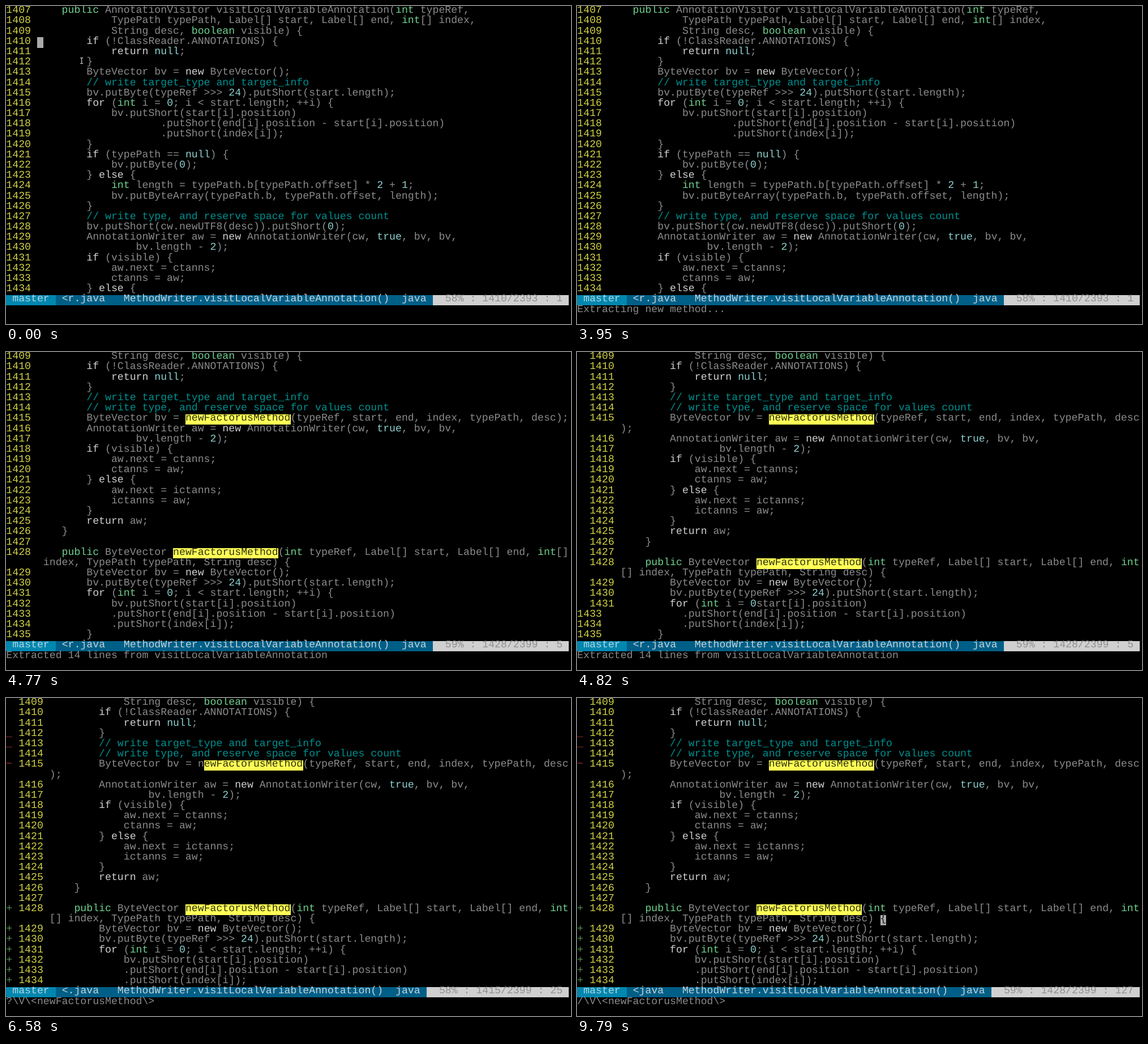
An HTML page that plays this animation: 998 px wide and 561 px high, repeating every 9.88 s.

```html
<!DOCTYPE html>
<html lang="en">
<head>
<meta charset="utf-8">
<title>Extract method in a terminal editor</title>
<style>
  html, body { margin: 0; width: 100%; height: 100%; overflow: hidden; background: #000; }
  svg { display: block; width: 998px; height: 561px; }
  text {
    font: 18.2px "Liberation Mono", "Courier New", monospace;
    fill-opacity: .82;
    white-space: pre;
    text-rendering: geometricPrecision;
  }
</style>
</head>
<body>
<svg id="screen" viewBox="0 0 998 561"></svg>
<script>
const LOOP = 9880, COLS = 91, ROWS = 28;
const LEFT = 0.35, TOP = 0.8, CELL_W = 10.922, CELL_H = 18.18, BASELINE = 11.5;
const GRAY = '#aaaaaa', YELLOW = '#ffff55', GREEN = '#87ffaf', CYAN = '#afffff',
      WHITE = '#ffffff', TEAL = '#00b0b0', RED = '#c03838', ADDED = '#5faf5f';

const HEAD = `        if (!ClassReader.ANNOTATIONS) {
            return null;
        }`;

const TAIL = `        AnnotationWriter aw = new AnnotationWriter(cw, true, bv, bv,
                bv.length - 2);
        if (visible) {
            aw.next = ctanns;
            ctanns = aw;
        } else {
            aw.next = ictanns;
            ictanns = aw;`;

const BEFORE = `    public AnnotationVisitor visitLocalVariableAnnotation(int typeRef,
            TypePath typePath, Label[] start, Label[] end, int[] index,
            String desc, boolean visible) {
${HEAD}
        ByteVector bv = new ByteVector();
        // write target_type and target_info
        bv.putByte(typeRef >>> 24).putShort(start.length);
        for (int i = 0; i < start.length; ++i) {
            bv.putShort(start[i].position)
                    .putShort(end[i].position - start[i].position)
                    .putShort(index[i]);
        }
        if (typePath == null) {
            bv.putByte(0);
        } else {
            int length = typePath.b[typePath.offset] * 2 + 1;
            bv.putByteArray(typePath.b, typePath.offset, length);
        }
        // write type, and reserve space for values count
        bv.putShort(cw.newUTF8(desc)).putShort(0);
${TAIL}`.split('\n');

const AFTER = `            String desc, boolean visible) {
${HEAD}
        // write target_type and target_info
        // write type, and reserve space for values count
        ByteVector bv = newFactorusMethod(typeRef, start, end, index, typePath, desc);
${TAIL}
        }
        return aw;
    }

    public ByteVector newFactorusMethod(int typeRef, Label[] start, Label[] end, int[] index, TypePath typePath, String desc) {
        ByteVector bv = new ByteVector();
        bv.putByte(typeRef >>> 24).putShort(start.length);
        for (int i = 0; i < start.length; ++i) {
            bv.putShort(start[i].position)
            .putShort(end[i].position - start[i].position)
            .putShort(index[i]);
        }`.split('\n');

// Number the lines and wrap them to the terminal width.
function layout(lines, first, gutter, signAt = () => ' ') {
  const rows = [], room = COLS - gutter;
  lines.forEach((line, i) => {
    const label = `${first + i} `.padStart(gutter);
    rows.push((gutter > 5 ? signAt(first + i) + label.slice(1) : label) + line.slice(0, room));
    if (line.length > room) rows.push(' '.repeat(gutter) + line.slice(room));
  });
  return rows.slice(0, ROWS);
}

const diffSign = n => n >= 1428 ? '+' : n === 1415 ? '~' : n === 1412 || n === 1413 ? '_' : ' ';

const unchanged = layout(BEFORE, 1407, 5);
const scrolled = layout(BEFORE.slice(2), 1409, 5);
const narrow = layout(AFTER, 1409, 5);
const wide = layout(AFTER, 1409, 7);
const signed = layout(AFTER, 1409, 7, diffSign);
const halfDrawn = [...wide.slice(0, 24), wide[24].slice(0, 29) + narrow[24].slice(29), ...narrow.slice(25)];

const FIRST_NAME = [6, 31], SECOND_NAME = [20, 29];
const FORWARD = '/\\V\\<newFactorusMethod\\>', BACKWARD = FORWARD.replace('/', '?');
const DONE = 'Extracted 14 lines from visitLocalVariableAnnotation';

const scene = (at, rows, line, total, col, message, cursor, pointer) =>
  ({ at, rows, line, total, col, message, cursor, pointer });
const start = (at, message, cursor, pointer) => scene(at, unchanged, 1410, 2393, 1, message, cursor, pointer);
const search = (at, line, col, message, cursor) => scene(at, signed, line, 2399, col, message, cursor);

const scenes = [
  start(0, '', [3, 5], true),
  start(2170, ':', [29, 1], true),
  start(2210, ':', [29, 1]),
  start(2680, ':F', [29, 2]),
  start(2970, ':FExtractMethod', [29, 15]),
  start(3950, 'Extracting new method...'),
  scene(4320, scrolled, 1409, 2393, 43, 'Finding best lines...'),
  scene(4770, narrow, 1428, 2399, 5, DONE),
  scene(4820, halfDrawn, 1428, 2399, 5, DONE),
  search(4870, 1428, 5, DONE, [20, 11]),
  search(5960, 1428, 23, FORWARD, SECOND_NAME),
  search(6580, 1415, 25, BACKWARD, FIRST_NAME),
  search(7640, 1416, 25, BACKWARD, [8, 31]),
  search(8240, 1415, 25, BACKWARD, FIRST_NAME),
  search(8520, 1428, 23, FORWARD, SECOND_NAME),
  search(9110, 1429, 23, FORWARD, [22, 29]),
  search(9460, 1428, 23, FORWARD, SECOND_NAME),
  search(9790, 1428, 127, FORWARD, [21, 49]),
];

const svg = document.getElementById('screen');
const MATCH = 'newFactorusMethod';
const TOKENS = /(\/\/.*)|\b(public|int|boolean)\b|\b(null\b|true\b|\d+)|\b(if|for|else|new|return)\b|(newFactorusMethod)/g;
const TOKEN_COLORS = [TEAL, GREEN, CYAN, WHITE, '#000'];

function add(parent, tag, attrs, content) {
  const node = document.createElementNS('http://www.w3.org/2000/svg', tag);
  for (const name in attrs) node.setAttribute(name, attrs[name]);
  if (content) node.textContent = content;
  return parent.appendChild(node);
}

const colX = col => LEFT + col * CELL_W;
const rowY = row => TOP + row * CELL_H;

// Cell backgrounds sit on whole pixels.
function block(row, col, count, fill) {
  const x = Math.round(colX(col)), y = Math.round(rowY(row));
  const width = Math.round(colX(col + count)) - x, height = Math.round(rowY(row + 1)) - y;
  add(svg, 'rect', { x, y, width, height, fill });
}

const write = (row, col, content, fill) =>
  add(svg, 'text', { x: colX(col), y: rowY(row) + BASELINE, fill }, content);

function drawCode(line, row) {
  const [, sign, label, code] = line.match(/^([+~_]?)(\s*\d{4} |\s+)(.*)$/);
  const found = line.indexOf(MATCH);
  if (found >= 0) block(row, found, MATCH.length, YELLOW);
  const text = write(row, 0, '', GRAY);
  const span = (content, fill) => content && add(text, 'tspan', { fill }, content);
  span(sign, sign === '+' ? ADDED : RED);
  span(label, YELLOW);
  let end = 0;
  for (const token of code.matchAll(TOKENS)) {
    span(code.slice(end, token.index), GRAY);
    span(token[0], TOKEN_COLORS[token.slice(1).findIndex(Boolean)]);
    end = token.index + token[0].length;
  }
  span(code.slice(end), GRAY);
}

function drawStatus({ line, total, col }) {
  const place = `${Math.floor(line / total * 100)}% : ${line}/${total} : ${col}`;
  const file = '<' + 'r.java'.slice(String(col).length - 1);
  const split = COLS - place.length - 3;
  block(ROWS, 0, split, '#005f87');
  block(ROWS, 0, 8, '#0087af');
  block(ROWS, split, COLS - split, '#d0d0d0');
  write(ROWS, 1, 'master', '#d7e8ee');
  write(ROWS, 9, `${file}   MethodWriter.visitLocalVariableAnnotation()  java`, '#eeeeee');
  write(ROWS, split + 2, place, '#808080');
}

function drawCursor([row, col], rows) {
  const line = rows[row] || '';
  const found = line.indexOf(MATCH);
  const onMatch = found >= 0 && col >= found && col < found + MATCH.length;
  block(row, col, 1, onMatch ? '#000' : GRAY);
  write(row, col, line[col] || '', onMatch ? GRAY : '#000');
}

function draw(state) {
  svg.replaceChildren();
  state.rows.forEach(drawCode);
  drawStatus(state);
  write(ROWS + 1, 0, state.message, GRAY);
  if (state.cursor) drawCursor(state.cursor, state.rows);
  if (state.pointer) {
    add(svg, 'path', {
      d: 'M131 91.5h1.8l.8.8.8-.8h1.8M133.6 92v9M131 101.5h1.8l.8-.8.8.8h1.8',
      fill: 'none', stroke: '#d8d8d8', 'stroke-width': 1.2
    });
  }
}

let shown = null;
function tick() {
  const time = performance.now() % LOOP;
  const current = scenes.findLast(s => s.at <= time);
  if (current !== shown) draw(shown = current);
  requestAnimationFrame(tick);
}
tick();
</script>
</body>
</html>
```
